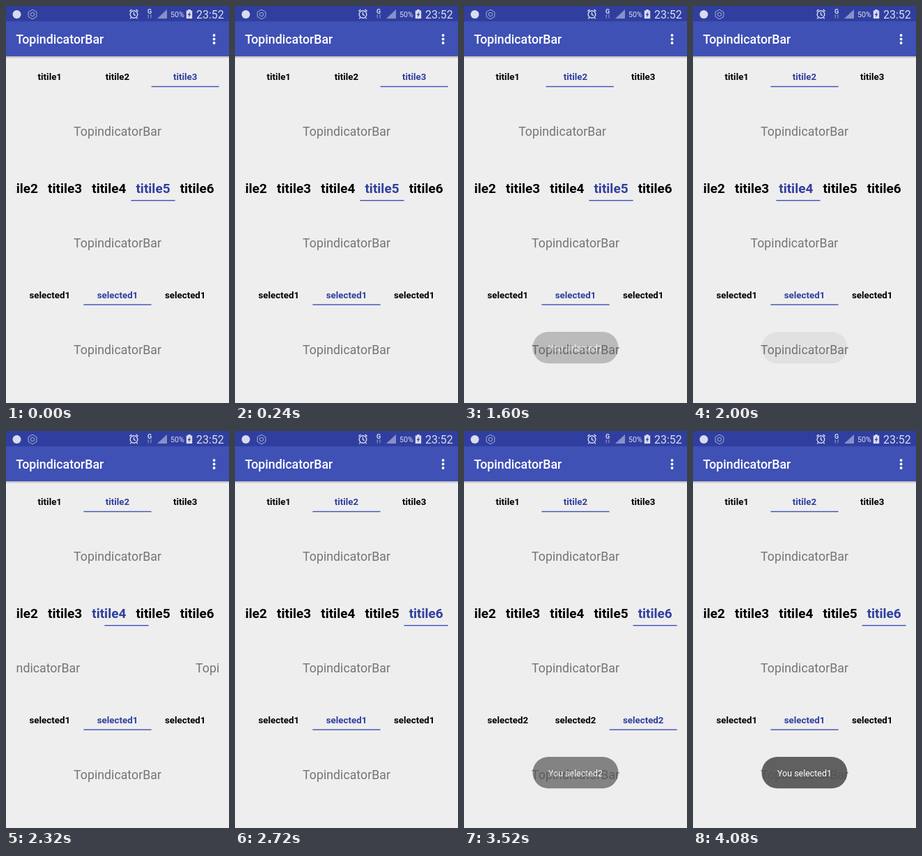
These frames come from a looping animation (320x569 px, 4160 ms). An HTML page:

```html
<!DOCTYPE html>
<html lang="en">
<head>
<meta charset="utf-8">
<title>Tab indicators</title>
<style>
  html, body { margin: 0; width: 100%; height: 100%; overflow: hidden; background: #eee; }
  svg { display: block; width: 100%; height: 100%; font-family: Roboto, "Noto Sans", sans-serif; }
  .mid { text-anchor: middle; }
  .tab { font-weight: 700; }
  .page { font-size: 17.78px; fill: #757575; }
</style>
</head>
<body>
<svg id="stage" viewBox="0 0 320 569">
  <defs>
    <clipPath id="inner"><rect x="14.2" y="72" width="291.6" height="497"/></clipPath>
    <linearGradient id="shade" x2="0" y2="1">
      <stop offset="0" stop-color="#000" stop-opacity=".28"/>
      <stop offset="1" stop-color="#000" stop-opacity="0"/>
    </linearGradient>
  </defs>
  <rect width="320" height="569" fill="#eee"/>
  <rect y="71.5" width="320" height="4" fill="url(#shade)"/>
  <rect width="320" height="72" fill="#3f51b5"/>
  <rect width="320" height="22" fill="#303f9f"/>

  <g id="status" fill="#d9dcee">
    <circle cx="15.5" cy="12" r="6"/>
    <g fill="none" stroke="#a9b0d8" stroke-width="1">
      <path d="M38 5.2l5.9 3.4v6.8L38 18.8l-5.9-3.4V8.6z"/>
      <circle cx="38" cy="12" r="2.7"/>
    </g>
    <g fill="none" stroke="#d9dcee" stroke-width="1.4">
      <circle cx="183.5" cy="12" r="5.3"/>
      <path d="M183.5 8.8V12.4l2.4 1.3M177.4 7.6l3-2.6M189.6 7.6l-3-2.6M179.6 16.6l-1.3 1.6M187.4 16.6l1.3 1.6"/>
    </g>
    <text x="206" y="11" class="mid" font-size="9" font-weight="700">G</text>
    <path d="M203.2 13.5h2l-1 -1.5zM203.7 13.5h1v4h-1zM207 16h2l-1 1.5zM207.5 12h1v4h-1z" opacity=".6"/>
    <path d="M231 5v13h-14z" fill="#8790c8"/>
    <text x="236" y="16" font-size="10.7">50%</text>
    <path d="M261.2 5h3.6v1.5h2.4V18h-8.4V6.5h2.4z"/>
    <path d="M264.3 8l-3.6 5h2.1l-1 3.5 3.6-5h-2.1z" fill="#303f9f"/>
    <text x="273" y="18" font-size="16">23:52</text>
  </g>

  <text x="14.2" y="53.8" font-size="17.78" font-weight="500" fill="#fff">TopindicatorBar</text>
  <g fill="#fff">
    <circle cx="298.6" cy="42" r="1.9"/><circle cx="298.6" cy="47.5" r="1.9"/><circle cx="298.6" cy="53" r="1.9"/>
  </g>

  <g id="bars" clip-path="url(#inner)"></g>

  <g id="toast">
    <rect x="98.5" y="467" width="123" height="45.3" rx="22.6" fill="#515151" fill-opacity=".9"/>
    <text id="note" x="160" y="494.8" class="mid" font-size="12.44" fill="#fff"></text>
  </g>
</svg>
<script>
const LOOP = 4160, STEP = 80, PAGE = 291.6, LEFT = 14.2;
const BLUE = '#303f9f';
const $ = id => document.getElementById(id);

function make(parent, tag, attrs) {
  const el = document.createElementNS('http://www.w3.org/2000/svg', tag);
  for (const key in attrs) el.setAttribute(key, attrs[key]);
  return parent.appendChild(el);
}

// Straight interpolation through [time, value] points
function track(points, t) {
  if (t <= points[0][0]) return points[0][1];
  for (let i = 1; i < points.length; i++) {
    const [t0, a] = points[i - 1], [t1, b] = points[i];
    if (t < t1) return a + (b - a) * (t - t0) / (t1 - t0);
  }
  return points[points.length - 1][1];
}

function makeBar({ first, count, x, cell, size, tabY, lineY, pageY }) {
  const g = $('bars');
  const tabs = Array.from({ length: count }, (_, i) => {
    const el = make(g, 'text', { class: 'tab mid', x: x + cell * (i + .5), y: tabY, 'font-size': size });
    el.textContent = 'titile' + (first + i);
    return el;
  });
  const line = make(g, 'rect', { y: lineY, width: cell, height: 1.4, fill: '#3f51b5' });
  const pages = tabs.map(() => {
    const el = make(g, 'text', { class: 'page mid', y: pageY });
    el.textContent = 'TopindicatorBar';
    return el;
  });
  return (pos, label) => {
    const active = Math.round(pos);
    tabs.forEach((el, i) => {
      el.setAttribute('fill', i === active ? BLUE : '#000');
      if (label) el.textContent = label;
    });
    line.setAttribute('x', x + cell * pos);
    pages.forEach((el, i) => el.setAttribute('x', 160 + (i - pos) * PAGE));
  };
}

const third = PAGE / 3, wide = 63.2;
const top3 = makeBar({ first: 1, count: 3, x: LEFT, cell: third, size: 13.33, tabY: 106.4, lineY: 114.8, pageY: 186.2 });
const scroll5 = makeBar({ first: 2, count: 5, x: LEFT + PAGE - 5 * wide, cell: wide, size: 19, tabY: 268.4, lineY: 278, pageY: 346.2 });
const low3 = makeBar({ first: 1, count: 3, x: LEFT, cell: third, size: 13.33, tabY: 418.8, lineY: 427.4, pageY: 498.8 });

const topMove = [[1120, 2], [1200, 1.887], [1280, 1.74], [1360, 1.55], [1440, 1.33], [1520, 1.16], [1600, 1.065], [1680, 1]];
const midMove = [[1680, 3], [1760, 2.87], [1840, 2.5], [1920, 2.17], [2000, 2.05], [2080, 2],
  [2240, 2], [2320, 2.4], [2400, 2.85], [2480, 3.25], [2560, 3.7], [2640, 3.94], [2720, 4]];
const fade = [[1480, 0], [1600, .36], [1760, .8], [1840, .6], [2000, .09], [2080, 0],
  [3200, 0], [3440, .75], [3600, .75], [3720, 0], [3760, 0], [4080, 1]];

function draw(time) {
  const t = Math.floor(time % LOOP / STEP) * STEP;
  const low = t >= 3200 && t < 3680 ? 2 : 1;
  top3(track(topMove, t));
  scroll5(track(midMove, t));
  low3(low, 'selected' + low);
  $('toast').setAttribute('opacity', track(fade, t));
  $('note').textContent = 'You selected' + (t >= 3200 && t < 3760 ? 2 : 1);
}

let start;
function tick(now) {
  if (start === undefined) start = now;
  draw(now - start);
  requestAnimationFrame(tick);
}
draw(0);
requestAnimationFrame(tick);
</script>
</body>
</html>
```
